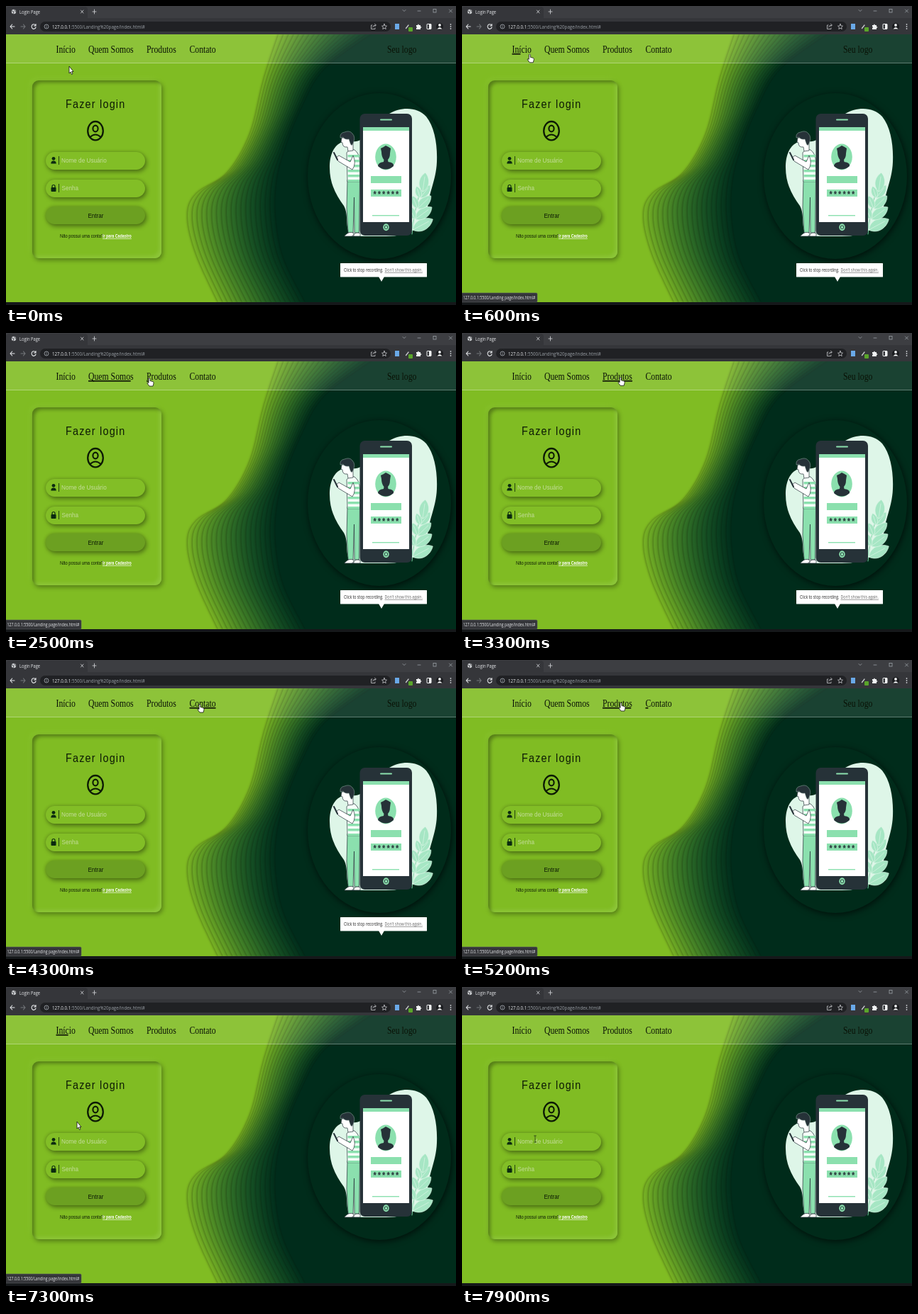
An HTML page that plays this animation: 634 px wide and 422 px high, repeating every 8 s.

```html
<!DOCTYPE html>
<html lang="pt">
<head>
<meta charset="utf-8">
<title>Login Page</title>
<style>
html, body { margin: 0; width: 100%; height: 100%; overflow: hidden; background: #80bc23; }
svg, div { position: absolute; box-sizing: border-box; }
svg { left: 0; top: 0; }
.wave { filter: drop-shadow(-1px 0 1.5px #0005); }
.card { left: 37px; top: 105px; width: 182px; height: 251px; border-radius: 9px; background: #80bc23;
  box-shadow: 2px 3px 6px #0005, -3px -3px 7px #86c12c, inset 4px 4px 5px -1px #0005, inset -5px -5px 5px -2px #8dc63a; }
.field { left: 56px; width: 140px; height: 25px; border-radius: 12.5px; background: #82be26;
  box-shadow: 2px 3px 6px #0006, -1px -1px 4px #0002; }
.button { background: #6ca021; }
</style>
</head>
<body>
<svg id="back" width="634" height="422"></svg>
<div class="card"></div>
<div class="field" style="top:206px"></div>
<div class="field" style="top:245px"></div>
<div class="field button" style="top:283px"></div>
<svg id="front" width="634" height="422"></svg>
<script>
const $ = id => document.getElementById(id);
const lerp = (a, b, p) => a + (b - a) * p;
const clamp = p => Math.max(0, Math.min(1, p));
const smooth = p => p * p * (3 - 2 * p);
const SANS = "'Liberation Sans',Arial,sans-serif";
const SERIF = "'Liberation Serif',Times,serif";
const UI = "'Open Sans','Noto Sans',sans-serif";

const text = (x, y, size, str, font = SANS, attrs = '') =>
  `<text transform="translate(${x} ${y}) scale(.845 1)" font-size="${size}" font-family="${font}" ${attrs}>${str}</text>`;
const rect = (x, y, w, h, fill, r = 0, attrs = '') =>
  `<rect x="${x}" y="${y}" width="${w}" height="${h}" rx="${r}" fill="${fill}" ${attrs}/>`;
const oval = (x, y, rx, ry, fill, attrs = '') =>
  `<ellipse cx="${x}" cy="${y}" rx="${rx}" ry="${ry}" fill="${fill}" ${attrs}/>`;
const circle = (x, y, r, fill, attrs = '') => oval(x, y, r, r, fill, attrs);
const path = (d, fill, attrs = '') => `<path d="${d}" fill="${fill}" ${attrs}/>`;
const line = (d, color, w = 1) => path(d, 'none', `stroke="${color}" stroke-width="${w}" stroke-linecap="round" stroke-linejoin="round"`);

// Smooth curve through points
function curve(pts) {
  let d = `M${pts[0]}`;
  for (let i = 0; i < pts.length - 1; i++) {
    const a = pts[Math.max(i - 1, 0)], b = pts[i], c = pts[i + 1], e = pts[Math.min(i + 2, pts.length - 1)];
    d += `C${b.map((v, j) => v + (c[j] - a[j]) / 6)} ${c.map((v, j) => v - (e[j] - b[j]) / 6)} ${c}`;
  }
  return d;
}

function waves() {
  const left = [[384, 40], [363, 105], [344, 180], [312, 235], [268, 265], [256, 297], [268, 350], [299, 418]];
  const right = [[515, 40], [448, 90], [416, 145], [394, 200], [382, 245], [380, 295], [391, 355], [422, 418]];
  const light = [116, 174, 36], middle = [26, 98, 44], dark = [0, 44, 27];
  const n = 18;
  let out = '';
  for (let k = 0; k <= n; k++) {
    const p = k / n;
    const pts = left.map((a, i) => a.map((v, j) => lerp(v, right[i][j], p)));
    const rgb = light.map((v, i) => Math.round(lerp(lerp(v, middle[i], p), lerp(middle[i], dark[i], p), p)));
    out += path(curve(pts) + 'L640 418V40Z', `rgb(${rgb})`, 'class="wave"');
  }
  return out;
}

$('back').innerHTML = waves() +
  oval(526, 240, 101, 117, '#002b1a', 'style="filter:drop-shadow(1px 2px 5px #000a)"') +
  rect(0, 40, 634, 41, '#fff', 0, 'opacity=".1"') + rect(0, 80, 634, 1, '#fff', 0, 'opacity=".3"');

function form() {
  const hint = 'fill="#c5dd9c"', ink = '#0c1a05';
  return text(84, 144, 17, 'Fazer login', SANS, `letter-spacing="1.45" fill="${ink}"`) +
    oval(126, 176.2, 10.8, 13.2, 'none', `stroke="${ink}" stroke-width="2.3"`) +
    oval(126, 173, 3.6, 4.4, 'none', `stroke="${ink}" stroke-width="2.1"`) +
    line('M118.5 185Q126 178 133.5 185', ink, 2.1) +
    circle(67, 215.3, 2.4, '#0b2a10') + path('M63.3 222.5Q63.3 218.6 67 218.6T70.7 222.5Z', '#0b2a10') +
    rect(63.5, 256, 7, 6, '#0b2a10', 1) + line('M65 256V254.5Q65 252.5 67 252.5T69 254.5V256', '#0b2a10', 1.2) +
    rect(74, 212, 1, 12, '#24440c') + rect(74, 251, 1, 12, '#24440c') +
    text(78, 221, 9.7, 'Nome de Usuário', SANS, hint) + text(78.5, 260, 9.6, 'Senha', SANS, hint) +
    text(115.5, 299, 9.5, 'Entrar', SANS, `fill="${ink}"`) + text(76, 327, 6.9, 'Não possui uma conta?', SANS, `fill="${ink}"`) +
    text(136, 327, 6.3, 'Ir para Cadastro', SANS, 'fill="#fff" font-weight="bold" text-decoration="underline"');
}

function leaf(x, y, angle, size) {
  return path(`M0 0C${-size * .4} ${-size * .3} ${-size * .25} ${-size * .8} 0 ${-size}C${size * .25} ${-size * .8} ${size * .4} ${-size * .3} 0 0V${-size * .8}`,
    '#a6e6c4', `transform="translate(${x} ${y}) rotate(${angle})" stroke="#def6e8" stroke-width=".6"`);
}

function artwork() {
  const ink = '#263238', mint = '#8be0ae', edge = `stroke="${ink}" stroke-width=".7"`;
  let out = path('M540 152C556 142 580 142 592 156C604 171 608 196 607 220C606 246 596 262 594 284C592 312 570 325 535 325H488C476 318 484 296 476 282C466 268 456 252 456 228C456 210 462 196 474 192C486 189 495 195 502 186Z', '#def6e8');
  // Plant
  out += line('M572 322Q576 278 588 250', '#7ccfa2', 1);
  for (let i = 0; i < 4; i++) {
    const y = 316 - i * 15, x = 573 + i * 3.5, size = 32 - i * 3;
    out += leaf(x, y, 62 - i * 8, size) + leaf(x, y, -32 + i * 5, size * .75);
  }
  out += leaf(587, 262, 8, 27);
  // Reader
  out += path('M481 245L480 285L482 320H489L490.5 270L491 320H497.5L498.5 245Z', mint, edge) +
    path('M477 324.5Q483 317 490 320.5V325H477ZM488 324.5Q493 318 499 321V325H488Z', '#fff', edge) +
    path('M480 207Q484 201 491 203Q498 208 498.5 220V248H481Z', '#f5fff9', edge);
  for (let y = 210; y < 247; y += 7) out += rect(481.5, y, 16.5, 3.4, mint);
  out += path('M473 186L472 192L474 193Q474 200 481 199L482 205L489 204V186Z', '#fff', edge) +
    path('M471 186Q470 179 477 178Q484 175 488 180Q493 185 489 194Q487 199 485 194L483 188Q477 189 475 185Z', ink, 'stroke="#9db5ac" stroke-width=".5"') +
    path('M489 211Q494 222 488 231L468 219L465 214L469 211L485 220Z', '#fff', edge) +
    line('M462 207L467 217', ink, 2);
  // Phone
  out += rect(498.5, 152, 73.5, 172, ink, 7) + rect(503, 171, 65, 134, '#fff') + rect(503, 171, 65, 5, mint) +
    rect(527, 159.5, 17, 2, mint, 1) + oval(535, 213, 14.8, 18.5, mint) +
    path('M529 206L528 201L532 199L535 197L539 199L542 201L541 208Q541 214 538 217L538.5 220Q547 221 546 226Q535 235 524 226Q524 221 532 220L532.5 217Q529 213 529 206Z', ink) +
    rect(514, 240, 43, 10, mint) + rect(514, 259, 43, 10, mint) +
    text(517.5, 270, 13, '******', SANS, `fill="${ink}" letter-spacing="2.4" font-weight="bold"`) +
    rect(516, 295, 38, 1.4, mint) +
    oval(535.5, 312.2, 4.2, 5, mint) + rect(533.5, 310, 4, 4.5, 'none', 1, `stroke="${ink}" stroke-width=".9"`);
  return out;
}

function browser() {
  const grey = '#c8cacd', dim = '#9aa0a6';
  return rect(0, 0, 634, 18, '#3d3e42') + rect(0, 1, 115, 18, '#35363a', 4) + rect(0, 17, 634, 23, '#35363a') +
    rect(48, 22, 494, 14, '#202124', 7) +
    circle(11, 8, 3.2, grey) + line('M8.5 7L11 8L10 11M12 5L13.5 8', '#35363a', .8) +
    text(19, 10.7, 6.8, 'Login Page', UI, 'fill="#e8eaed"') +
    line('M105.5 6L109 10M109 6L105.5 10M122 8H127M124.5 5V11', grey, .9) +
    line('M12 29H6M8.7 26L6 29L8.7 32', '#e8eaed', 1.1) + line('M21 29H27M24.5 26L27 29L24.5 32', '#75787c', 1.1) +
    line('M41.5 27A3 3.3 0 1 0 42 30M42 25.5V28H39.5', '#e8eaed', 1.1) +
    circle(57, 29, 3, 'none', `stroke="${dim}" stroke-width=".9"`) + line('M57 28.8V30.5M57 27.3V27.4', dim, .8) +
    text(65, 31.5, 7.35, `<tspan fill="#e8eaed">127.0.0.1</tspan>:5500/Landing%20page/index.html#`, UI, `fill="${dim}"`) +
    line('M516 27H514.5V32.5H520V31M516.5 30Q517 27 521 27M519.5 25.3L521.3 27L519.5 28.7', grey, .8) +
    line('M533 25.3L534 28L536.5 28.2L534.6 30L535.2 32.6L533 31.2L530.8 32.6L531.4 30L529.5 28.2L532 28Z', grey, .8) +
    rect(548, 25, 6, 8, '#6aa9e8') + rect(567, 30, 6, 6, '#5aa52a', 1) + line('M563.5 31.5L567 27', grey, 1.3) +
    path('M578 27H580Q580.8 24 582 27H584V29Q587 30 584 31V33H578V31Q580 30 578 29Z', '#f1f3f4') +
    rect(593, 25.5, 6, 7, 'none', .5, `stroke="#f1f3f4"`) + rect(596, 25.5, 3, 7, '#f1f3f4') +
    circle(611, 29, 5, '#1b1c1f') + circle(611, 27, 1.9, '#f1f3f4') + path('M607.5 32.5Q611 27.5 614.5 32.5Z', '#f1f3f4') +
    [26, 29, 32].map(y => circle(626.5, y, .9, grey)).join('') +
    line('M559 5.5L561 7.5L563 5.5M580 7H584M624.5 5L628.5 9M628.5 5L624.5 9', dim, .8) +
    rect(602, 4.5, 4, 4.5, 'none', 0, `stroke="${dim}" stroke-width=".8"`) +
    rect(0, 418, 634, 4, '#15181a');
}

const links = [
  { x: 70.5, w: 28, name: 'Início', hover: [[420, 1560], [6580, 7130]] },
  { x: 116, w: 63.5, name: 'Quem Somos', hover: [[1620, 2440], [5740, 6470]] },
  { x: 198, w: 42, name: 'Produtos', hover: [[2415, 3620], [4850, 5620]] },
  { x: 258.5, w: 37, name: 'Contato', hover: [[3700, 4880]] },
];

const tooltip = `<g id="tip">` + rect(471, 363, 122, 19.5, '#fff', .5) + path('M525 382H533L529 389Z', '#fff') +
  text(476, 375.2, 6.2, 'Click to stop recording.', UI, 'fill="#222"') +
  text(533.5, 375.2, 6.2, 'Don\'t show this again.', UI, 'fill="#666" text-decoration="underline"') + '</g>';

const status = `<g id="status">` + rect(-2, 405, 108, 13, '#35363a', 1.5, 'stroke="#55585c" stroke-width=".6"') +
  text(1.5, 414, 6.25, '127.0.0.1:5500/Landing page/index.html#', UI, 'fill="#e2e4e7"') + '</g>';

// Pointer shapes have their hot spot at the origin
const outline = 'stroke="#111" stroke-width=".8" stroke-linejoin="round"';
const pointer = `<g id="pointer">` +
  path('M0 0V10L2 8L3.5 11.5L5 10.7L3.6 7.5H6Z', '#fff', outline) +
  path('M-1 1Q0 -1 1 1V4.5L5 5.5Q6.3 6 6 8L5 12H0L-3 8Q-3.5 6 -1 7.5Z', '#fff', outline) +
  line('M-1.5 -4H1.5M0 -4V5M-1.5 5H1.5', '#34501a', .9) + '</g>';

const menu = 'fill="#0a1206"';
$('front').innerHTML = form() + artwork() + browser() +
  links.map(l => text(l.x, 66, 13.9, l.name, SERIF, menu) + rect(l.x, 67, 0, 1.5, '#000', 0, 'class="under"')).join('') +
  text(537, 66, 13.9, 'Seu logo', SERIF, menu) + tooltip + status + pointer;

const unders = document.querySelectorAll('.under');
const shapes = [...$('pointer').children];
const route = [
  [0, 89, 85], [200, 90, 81], [450, 95, 68], [1200, 98, 66], [1500, 100, 66], [1650, 124, 64],
  [2300, 172, 63], [2500, 202, 63], [2900, 215, 63], [3500, 226, 62], [3750, 262, 62], [4000, 273, 62],
  [4750, 273, 62], [4900, 240, 60], [5200, 224, 60], [5550, 206, 61], [5750, 172, 63], [6350, 125, 65],
  [6500, 96, 66], [7000, 92, 66], [7300, 100, 190], [7600, 103, 213], [7900, 103, 214],
];

function position(t) {
  const i = Math.max(1, route.findIndex(k => k[0] >= t));
  const [a, b] = [route[i - 1], route[i]];
  const p = smooth(clamp((t - a[0]) / (b[0] - a[0])));
  return [lerp(a[1], b[1], p), lerp(a[2], b[2], p)];
}

function draw(t) {
  const [x, y] = position(t);
  $('pointer').setAttribute('transform', `translate(${x} ${y})`);
  const hovered = links.some(l => l.hover.some(([on, off]) => t >= on && t < off));
  const shape = hovered ? 1 : y > 206 ? 2 : 0;
  shapes.forEach((s, i) => s.style.display = i === shape ? '' : 'none');
  links.forEach((l, i) => {
    const grown = Math.max(...l.hover.map(([on, off]) =>
      smooth(clamp((t - on) / 400)) - smooth(clamp((t - off) / 400))));
    unders[i].setAttribute('width', l.w * grown);
  });
  $('status').style.display = t >= 500 && t < 7500 ? '' : 'none';
  $('tip').style.display = t < 4800 ? '' : 'none';
}

const start = performance.now();
function tick() {
  const t = Math.max(0, performance.now() - start) % 8000;
  draw(Math.floor(t / 100) * 100);
  requestAnimationFrame(tick);
}
tick();
</script>
</body>
</html>
```
